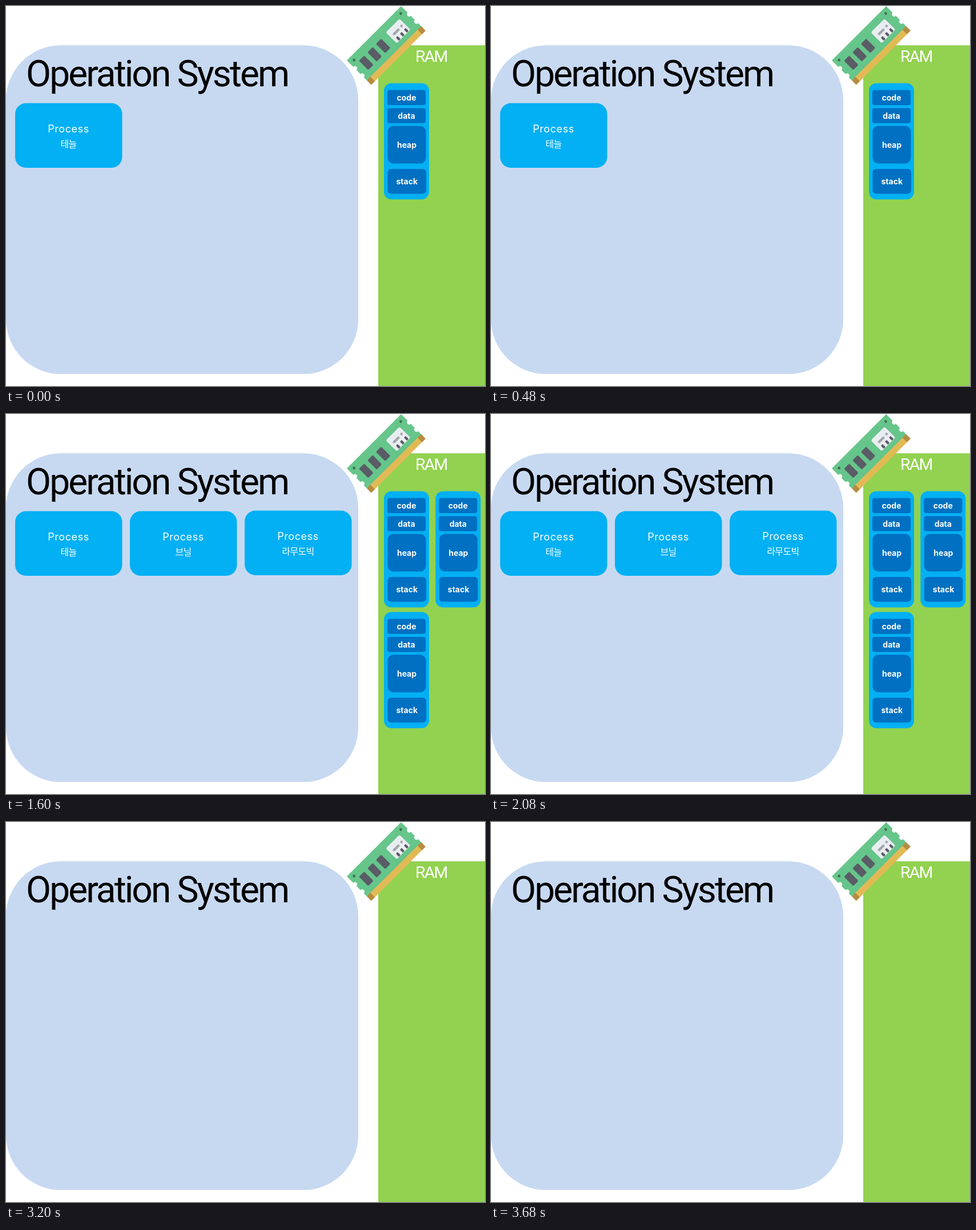
An HTML page for the animation above (4 s loop, 839 by 667 pixels).

```html
<!DOCTYPE html>
<html lang="ko">
<head>
<meta charset="utf-8">
<title>Processes in memory</title>
<style>
  html, body { margin: 0; width: 100%; height: 100%; overflow: hidden; background: #fff; }
  svg { display: block; }
  text { font-family: Inter, sans-serif; fill: #fff; text-anchor: middle; }
  .title { font: 64px Roboto, sans-serif; letter-spacing: -2.9px; fill: #000; text-anchor: start; }
  .ram { font: 28.5px Roboto, sans-serif; letter-spacing: -1.8px; text-anchor: start; }
  .kind { font-size: 18px; letter-spacing: .6px; }
  .app { font: 500 16px "Noto Sans CJK KR", "Noto Sans CJK", sans-serif; letter-spacing: -.6px; }
  .part { font-size: 14px; font-weight: 700; }
</style>
</head>
<body>
<svg width="839" height="667" viewBox="0 0 839 667">
  <rect y="69" width="617" height="577" rx="96" fill="#c7d9f1"/>
  <text class="title" x="35" y="141">Operation System</text>
  <rect x="652" y="69" width="187" height="598" fill="#92d250"/>
  <text class="ram" x="717" y="98">RAM</text>
  <g id="stick" transform="translate(597 95.5) rotate(-45)"></g>
  <g id="steps"></g>
</svg>
<script>
const STEP = 800, LOOP = 4000;
const apps = [
  { name: "테늘", x: 16, y: 170.5 },
  { name: "브닐", x: 217, y: 170.5 },
  { name: "라무도빅", x: 418, y: 169.5 },
  { name: "보르칸", x: 16, y: 301 }
];

const rect = (x, y, w, h, r, fill) =>
  `<rect x="${x}" y="${y}" width="${w}" height="${h}" rx="${r}" fill="${fill}"/>`;
const dot = (x, y, r, fill) => `<circle cx="${x}" cy="${y}" r="${r}" fill="${fill}"/>`;
const label = (kind, x, y, s) => `<text class="${kind}" x="${x}" y="${y}">${s}</text>`;

function memoryStick() {
  const chips = [21, 42, 63].map(u => rect(u - 6.5, 15.5, 13, 23, 2, "#5a5c66"));
  const pins = [91, 101, 111].map(u => rect(u - 2.2, 32.5, 4.4, 7.5, 1.5, "#5a5c66"));
  const notches = [0, 134.5].flatMap(u => [20, 38].map(v => dot(u, v, 4, "#fff")));
  return [
    rect(0, 0, 134.5, 50, 1, "#66c58a"),
    rect(0, 49.5, 134.5, 11, 0, "#e2ba55"),
    rect(0, 49.5, 9, 11, 0, "#b58d42"),
    rect(125.5, 49.5, 9, 11, 0, "#b58d42"),
    ...notches,
    dot(9.5, 8.5, 2.4, "#3f7058"), dot(125, 8.5, 2.4, "#3f7058"),
    ...chips,
    rect(83, 13.5, 34, 27, 3, "#e9edf1"),
    rect(89, 23.5, 15, 4.5, 2.2, "#a3a5ab"),
    dot(110.5, 25, 2.3, "#a3a5ab"),
    ...pins
  ].join("");
}

const processCard = ({ name, x, y }) =>
  `<g transform="translate(${x} ${y})">` +
  rect(0, 0, 187.5, 113.5, 19, "#02b0f3") +
  label("kind", 93.5, 51.5, "Process") + label("app", 93.5, 77, name) + "</g>";

function memoryBlock(i) {
  const block = (s, x, y, w, h, r) =>
    rect(x, y, w, h, r, "#0070c2") + label("part", x + w / 2, y + h / 2 + 5, s);
  return `<g transform="translate(${662 + i % 2 * 90.3} ${135.5 + (i >> 1) * 212})">` +
    rect(0, 0, 79, 204, 13, "#02b0f3") +
    block("code", 6, 12, 67, 26.5, 4) +
    block("data", 6, 43.8, 67, 26.5, 4) +
    block("heap", 6.5, 75, 67, 66, 10) +
    block("stack", 6.5, 150.5, 67.5, 43.5, 6) + "</g>";
}

document.getElementById("stick").innerHTML = memoryStick();
const steps = document.getElementById("steps");
steps.innerHTML = apps.map((app, i) => `<g>${processCard(app)}${memoryBlock(i)}</g>`).join("");

// Processes start one by one; the last step clears them all.
function draw(now) {
  const step = Math.floor(now % LOOP / STEP);
  [...steps.children].forEach((g, i) => {
    g.style.display = step < apps.length && i <= step ? "" : "none";
  });
  requestAnimationFrame(draw);
}
draw(0);
</script>
</body>
</html>
```
